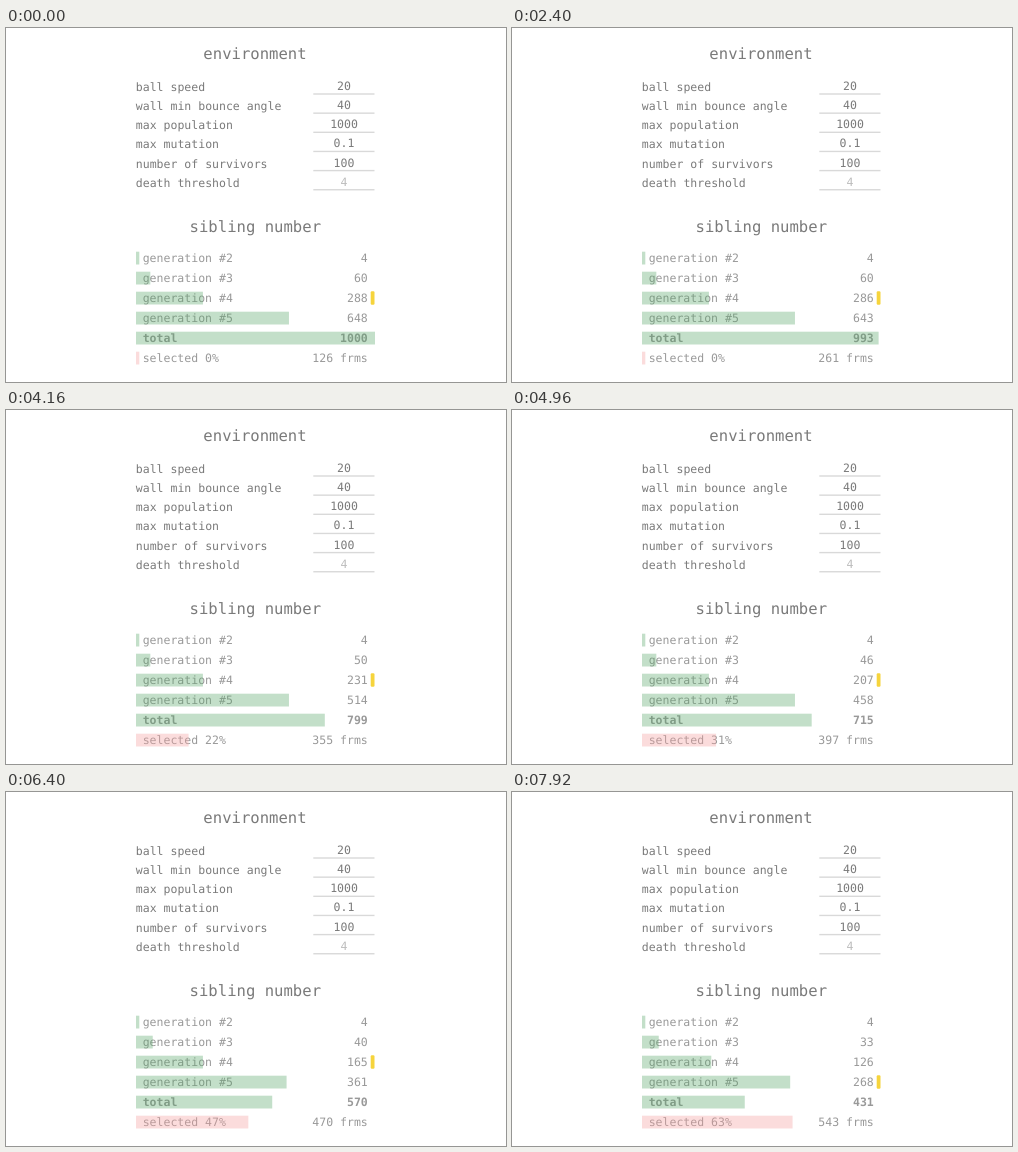
These frames come from a looping animation (500 by 354 pixels, 8 s). An HTML page:

```html
<!DOCTYPE html>
<html lang="en">
<head>
<meta charset="utf-8">
<title>Population panel</title>
<style>
  html, body { margin: 0; width: 100%; height: 100%; overflow: hidden; background: #fff; }
  svg { display: block; width: 500px; height: 354px; }
  text {
    font: 11.53px "DejaVu Sans Mono", "Liberation Mono", monospace;
    fill: #7a7a7a; white-space: pre; text-rendering: geometricPrecision;
  }
  .title { font-size: 15.6px; text-anchor: middle; }
  .value { text-anchor: middle; }
  .dim { fill: #bdbdbd; }
  .stat { fill: #999; }
  .count { text-anchor: end; }
  .bold { font-weight: bold; }
  .green { fill: #54a465; opacity: .35; }
  .pink { fill: #f49b9b; opacity: .35; }
</style>
</head>
<body>
<svg id="stage" viewBox="0 0 500 354"></svg>
<script>
const LOOP = 8000, STEP = 80;
const LEFT = 130, FULL = 239, FIRST_ROW = 230, ROW = 20;
const START = 1000, SURVIVORS = 100;
const stage = document.getElementById('stage');

function add(tag, attrs, content = '') {
  const el = document.createElementNS('http://www.w3.org/2000/svg', tag);
  for (const key in attrs) el.setAttribute(key, attrs[key]);
  el.textContent = content;
  return stage.appendChild(el);
}

const settings = [
  ['ball speed', '20'], ['wall min bounce angle', '40'], ['max population', '1000'],
  ['max mutation', '0.1'], ['number of survivors', '100'], ['death threshold', '4']
];

add('text', { class: 'title', x: 249, y: 31.3 }, 'environment');
settings.forEach(([label, value], i) => {
  const y = 63 + i * 19.15;
  add('text', { x: 129.8, y }, label);
  add('text', { class: i === 5 ? 'value dim' : 'value', x: 338, y: y - 1 }, value);
  add('rect', { x: 307.3, y: y + 2.3, width: 61.2, height: 1.4, fill: '#d9d9d9' });
});
add('text', { class: 'title', x: 249.3, y: 204.3 }, 'sibling number');

const rows = ['generation #2', 'generation #3', 'generation #4', 'generation #5', 'total', 'selected 0%']
  .map((name, i) => {
    const mid = FIRST_ROW + i * ROW;
    const bold = i === 4 ? ' bold' : '';
    return {
      label: add('text', { class: 'stat' + bold, x: 136.7, y: mid + 4.1 }, name),
      count: add('text', { class: 'stat count' + bold, x: 361.8, y: mid + 4.1 }),
      bar: add('rect', { class: i === 5 ? 'pink' : 'green', x: LEFT, y: mid - 6.3, height: 12.8 })
    };
  });
const marker = add('rect', { x: 364.7, width: 3.8, height: 13.5, rx: 1.2, fill: '#f6d43c' });

// [seconds, population], linear in between
const decline = [[1.9, 1000], [2.6, 990], [3.44, 875], [4.96, 715], [5.92, 630], [6.96, 501], [7.92, 431]];

function population(s) {
  const next = decline.findIndex(p => p[0] >= s);
  if (next === 0) return START;
  const [t0, a] = decline[next - 1], [t1, b] = decline[next];
  return Math.round(a + (b - a) * (s - t0) / (t1 - t0));
}

const percent = share => Math.floor(share * 100 + 1e-6);

function setRow(i, count, share) {
  rows[i].count.textContent = count;
  rows[i].bar.setAttribute('width', Math.max(3.3, FULL * percent(share) / 100));
}

function draw(time) {
  const s = Math.floor(time % LOOP / STEP) * STEP / 1000;
  const total = population(s);
  const dead = START - total;
  const third = Math.round(60 - dead * 0.0475);
  const fourth = Math.round(288 - dead * 0.285);
  const siblings = [4, third, fourth, total - 4 - third - fourth];
  const selected = dead / (START - SURVIVORS);
  const frames = Math.round(126 + s * (57.9 - 0.66 * s));

  siblings.forEach((n, i) => setRow(i, n, n / total));
  setRow(4, total, total / START);
  setRow(5, `${frames} frms`, selected);
  rows[5].label.textContent = `selected ${percent(selected)}%`;

  const leader = s < 7.4 ? 2 : 3;
  marker.setAttribute('y', FIRST_ROW + leader * ROW - 6.7);
}

const begin = performance.now();
function tick() {
  draw(performance.now() - begin);
  requestAnimationFrame(tick);
}
draw(0);
requestAnimationFrame(tick);
</script>
</body>
</html>
```
